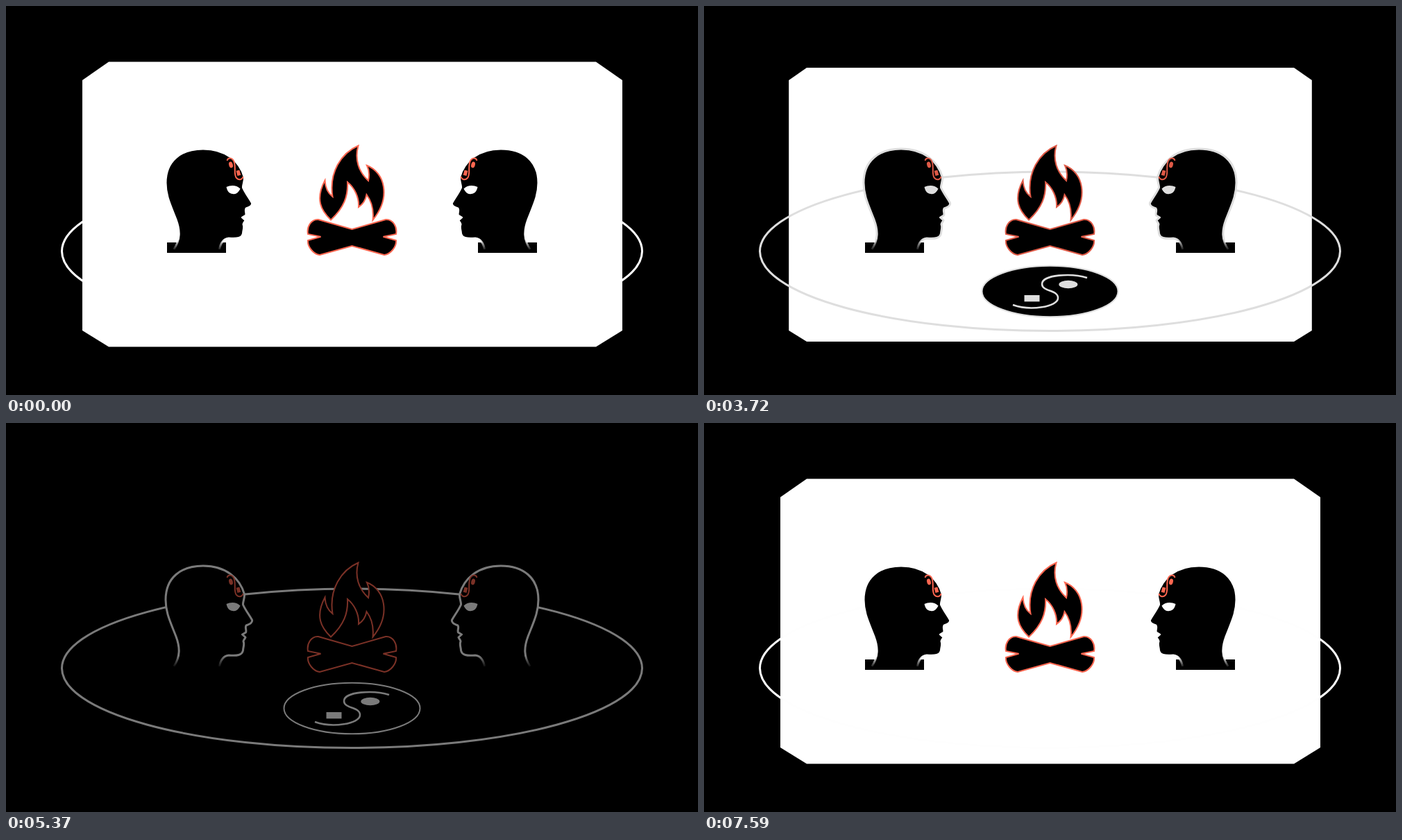
Write an HTML page that moves like this. It is 997 px wide and 561 px high and loops after 7.68 s.

```html
<!DOCTYPE html>
<html lang="en">
<head>
<meta charset="utf-8">
<title>Campfire</title>
<style>
  @property --k { syntax: "<number>"; inherits: false; initial-value: 0; }

  html, body { margin: 0; width: 100%; height: 100%; overflow: hidden; background: #000; }
  .panel, svg { position: absolute; left: 0; top: 0; width: 997px; height: 561px; }

  /* --k shrinks the panel from its full size (0) to its core (1) */
  .panel {
    --l: calc(110px + 38px * var(--k));
    --r: calc(888px - 38px * var(--k));
    --t: calc(80.5px + 26.5px * var(--k));
    --b: calc(491.5px - 23px * var(--k));
    background: #fff;
    clip-path: polygon(148px var(--t), 850px var(--t), var(--r) 107px, var(--r) 468px,
      850px var(--b), 148px var(--b), var(--l) 468px, var(--l) 107px);
    animation: shrink 7680ms linear infinite, blink 7680ms step-end infinite;
  }
  .scene { animation: dim 7680ms linear infinite; }
  .disc { animation: appear 7680ms linear infinite; }

  @keyframes shrink {
    0%, 37.5% { --k: 0; }
    45.31% { --k: .1; }
    48.44% { --k: .32; }
    50.78% { --k: .56; }
    53.5%, 87.1% { --k: .88; }
    89.84% { --k: .56; }
    92.1% { --k: .33; }
    95.31% { --k: .1; }
    98.83%, 100% { --k: 0; }
  }
  @keyframes blink {
    0% { visibility: visible; }
    53.5% { visibility: hidden; }
    87.1%, 100% { visibility: visible; }
  }
  @keyframes dim {
    0% { filter: brightness(1); }
    37.5% { filter: brightness(1); animation-timing-function: cubic-bezier(.364, 0, .636, 1); }
    70.31% { filter: brightness(.48); animation-timing-function: cubic-bezier(.44, 0, .71, 1); }
    100% { filter: brightness(1); }
  }
  @keyframes appear {
    0%, 27.34% { opacity: 0; }
    37.2%, 72.27% { opacity: 1; }
    80.7%, 100% { opacity: 0; }
  }

  .line { fill: none; stroke: #fff; stroke-width: 3; }
  .white { fill: #fff; }
  .red { fill: #000; stroke: #ff6650; stroke-width: 2; stroke-linejoin: miter; }
  .mark { fill: #ff6650; }
</style>
</head>
<body>
<div class="panel"></div>
<svg class="scene" viewBox="0 0 997 561">
  <defs>
    <linearGradient id="neck" gradientUnits="userSpaceOnUse" x1="0" y1="336" x2="0" y2="353">
      <stop offset="0" stop-color="#fff"/>
      <stop offset="1" stop-color="#fff" stop-opacity="0"/>
    </linearGradient>
    <g id="head">
      <path d="M232 341H317V356H232Z"/>
      <path stroke="url(#neck)" stroke-width="3" stroke-linejoin="round" d="M242 351
        C251 337 251 324 245 308 C236 285 230 273 230 255
        C230 223 252 206 284 206 C317 206 337 224 343.5 247
        C344 253 341 258 341.500 262 C345 270 350 276 354.500 284
        C355.500 288 352 290 346 292 C344 295 347 299 345.500 302
        L340.500 305 L345 309 C344 312 342 313 342 315
        C344 319 341.500 324 341.500 328 C340 335 333 336 321 335
        C312 336 309 343 307.500 351"/>
      <path class="white" d="M317.500 261 C324 258 332 258 337.500 263.500
        C335 269 331 272 327 271 C321 270.500 319 267 317.500 261Z"/>
      <path class="red" style="fill:none" d="M318.500 223 C320 218 327 218 329 226
        C331 234 328 243 332 248 C336 252 341 250 341.500 246"/>
      <ellipse class="mark" cx="324" cy="229" rx="2.800" ry="4.500" transform="rotate(-15 324 229)"/>
      <rect class="mark" x="332.500" y="237" width="5" height="7.500" transform="rotate(-15 335 241)"/>
    </g>
  </defs>

  <ellipse class="line" cx="498.500" cy="353.800" rx="418" ry="114.800"/>
  <use href="#head"/>
  <use href="#head" transform="matrix(-1 0 0 1 997 0)"/>

  <path class="red" d="M468 308.500 C454 295 445 279 459.500 251.500
    C460 262 464 270 470.500 275 C465 240 483 212 507.500 201.500
    C502 221 508 239 522 252 C524 243 523 236 520 230
    C546 240 555 276 528.500 308.500 C530 294 527 282 519.500 272
    C518 280 514 286 508 290 C509 276 502 262 492 254
    C493 274 487 291 468 308.500Z"/>
  <path class="red" d="M450 308 L498.500 322 L547 308
    C557 307 564 318 562 329 L543.500 332.800 L562 338
    C563 347 554 358 545 359 L498.500 346 L452 359
    C443 358 434 347 435 338 L453.500 332.800 L435 329
    C433 318 440 307 450 308Z"/>

  <g class="disc">
    <ellipse cx="498.500" cy="411.500" rx="98" ry="36.800" stroke="#fff" stroke-width="2"/>
    <path class="line" style="stroke-width:2.600" d="M552 392 C530 385 487 387 487 401
      C487 412 510 409 510 421 C510 434 470 440 445 431"/>
    <ellipse class="white" cx="524.800" cy="401.500" rx="13.500" ry="5.700"/>
    <rect class="white" x="461.500" y="417" width="22" height="9.300"/>
  </g>
</svg>
</body>
</html>
```
